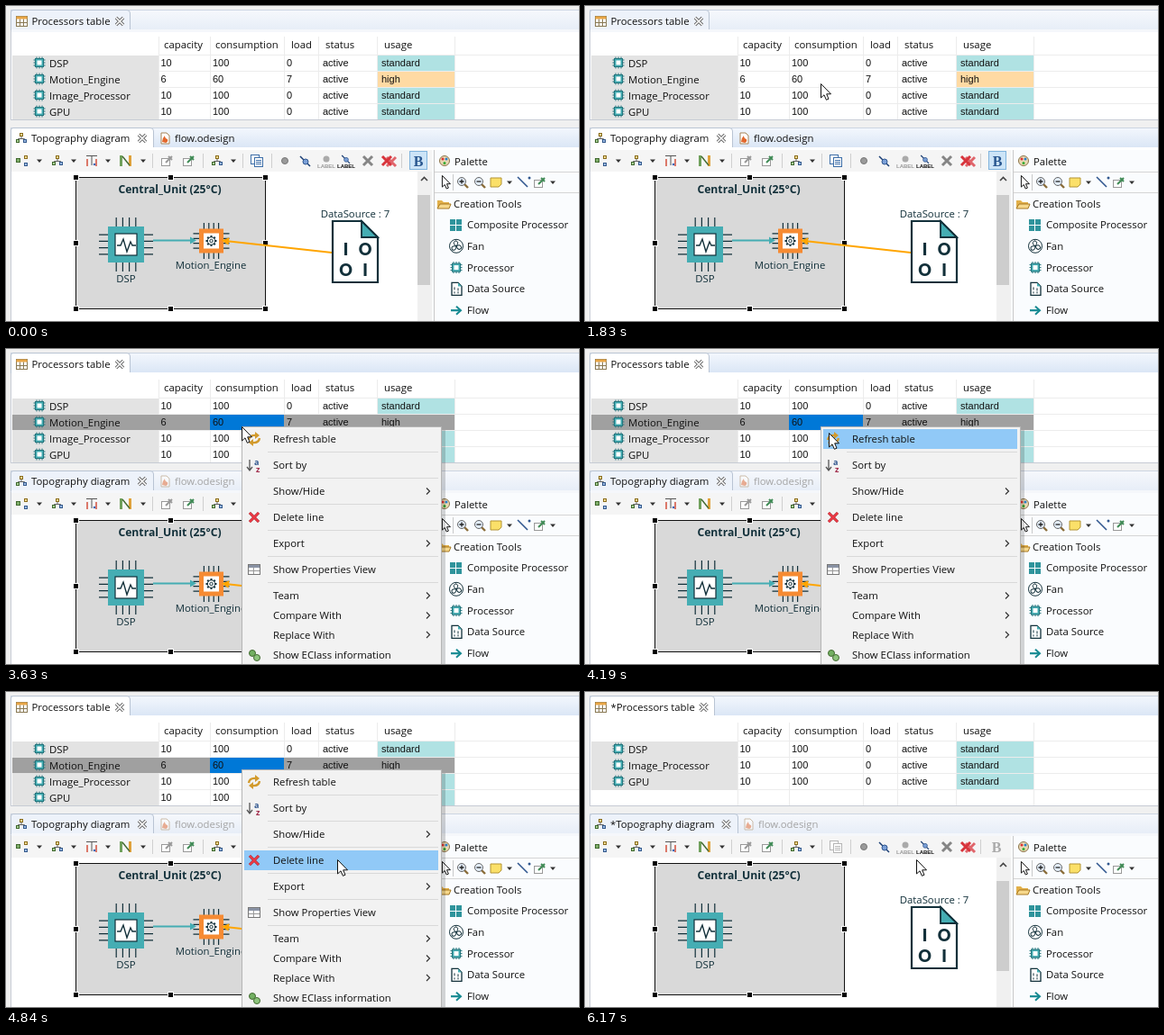
An HTML page that plays this animation: 635 by 350 pixels, repeating every 8.54 s.

```html
<!DOCTYPE html>
<html lang="en">
<head>
<meta charset="utf-8">
<title>Processors table and topography diagram</title>
<style>
html, body { margin: 0; width: 100%; height: 100%; overflow: hidden; background: #f0f0f0; }
svg { display: block; }
text { font: 11.35px "Open Sans", "Noto Sans", sans-serif; fill: #111; white-space: pre; }
.cell { font: 11px "Liberation Sans", Arial, sans-serif; }
.bold { font-weight: 700; font-size: 12.2px; fill: #12303a; }
.dia { fill: #12303a; }
.dim { fill: #a3a3a3; }
.bits { font: 900 18px Lato, "Liberation Sans", sans-serif; fill: #12303a; }
.tag { font: 700 6px "Liberation Sans", sans-serif; }
.bee { font: 700 16px "Liberation Serif", serif; }
.t { animation: 8540ms step-end infinite; opacity: 0; }
.idle { animation-name: idle; }
.busy { animation-name: busy; }
.toolsOn { animation-name: toolsOn; }
.toolsOff { animation-name: toolsOff; }
.sel { animation-name: sel; }
.before { animation-name: before; }
.after { animation-name: after; }
.menu { animation-name: menu; }
.hot0 { animation-name: hot0; }
.hot1 { animation-name: hot1; }
.hot2 { animation-name: hot2; }
.hot3 { animation-name: hot3; }
.ghost { animation-name: ghost; }
.pointer { animation-name: pointer; }
@keyframes idle { 0% { opacity: 1 } 27.985%, 100% { opacity: 0 } }
@keyframes busy { 0% { opacity: 0 } 27.985%, 100% { opacity: 1 } }
@keyframes toolsOn { 0% { opacity: 1 } 29.742%, 100% { opacity: 0 } }
@keyframes toolsOff { 0% { opacity: 0 } 29.742%, 100% { opacity: 1 } }
@keyframes sel { 0% { opacity: 0 } 27.985% { opacity: 1 } 72.248%, 100% { opacity: 0 } }
@keyframes before { 0% { opacity: 1 } 72.248%, 100% { opacity: 0 } }
@keyframes after { 0% { opacity: 0 } 72.248%, 100% { opacity: 1 } }
@keyframes menu { 0% { opacity: 0 } 42.505% { opacity: 1 } 69.437%, 100% { opacity: 0 } }
@keyframes hot0 { 0% { opacity: 0 } 49.063% { opacity: 1 } 50.468%, 100% { opacity: 0 } }
@keyframes hot1 { 0% { opacity: 0 } 52.107% { opacity: 1 } 53.512%, 100% { opacity: 0 } }
@keyframes hot2 { 0% { opacity: 0 } 53.512% { opacity: 1 } 54.918%, 100% { opacity: 0 } }
@keyframes hot3 { 0% { opacity: 0 } 54.918% { opacity: 1 } 69.437%, 100% { opacity: 0 } }
@keyframes ghost { 0% { opacity: 0 } 69.437% { opacity: .68 } 70.843%, 100% { opacity: 0 } }
@keyframes pointer {
  0% { opacity: 0; transform: translate(224px, -4px) }
  9.953% { opacity: 1; transform: translate(224px, -4px) }
  11.709% { opacity: 1; transform: translate(228px, 14px) }
  13.114% { opacity: 1; transform: translate(231px, 36px) }
  14.871% { opacity: 1; transform: translate(249px, 70px) }
  16.276% { opacity: 1; transform: translate(260px, 88px) }
  18.149% { opacity: 1; transform: translate(261px, 89px) }
  21.428% { opacity: 1; transform: translate(261px, 86px) }
  49.063% { opacity: 1; transform: translate(270px, 93px) }
  50.468% { opacity: 1; transform: translate(290px, 117px) }
  52.107% { opacity: 1; transform: translate(316px, 134px) }
  53.512% { opacity: 1; transform: translate(340px, 161px) }
  54.918% { opacity: 1; transform: translate(356px, 181px) }
  56.674%, 100% { opacity: 1; transform: translate(367px, 186px) }
}
</style>
</head>
<body>
<svg id="stage" width="635" height="350" viewBox="0 0 635 350"></svg>
<script>
const TEAL = '#45adb3', DEEP = '#23757d', INK = '#12303a', ORANGE = '#f68b33';

const rect = (x, y, w, h, fill, more = '') =>
  `<rect x="${x}" y="${y}" width="${w}" height="${h}" fill="${fill}" ${more}/>`;
const line = (d, stroke, w = 1, fill = 'none') =>
  `<path d="${d}" stroke="${stroke}" stroke-width="${w}" fill="${fill}"/>`;
const fill = (d, color) => `<path d="${d}" fill="${color}"/>`;
const dot = (x, y, r, color, more = '') => `<circle cx="${x}" cy="${y}" r="${r}" fill="${color}" ${more}/>`;
const text = (x, y, s, cls = '') => `<text x="${x}" y="${y}" class="${cls}">${s}</text>`;
const mid = (x, y, s, cls) => `<text x="${x}" y="${y}" class="${cls}" text-anchor="middle">${s}</text>`;
const at = (x, y, s) => `<g transform="translate(${x} ${y})">${s}</g>`;
const timed = (cls, s) => `<g class="t ${cls}">${s}</g>`;
const each = (list, f) => list.map(f).join('');

// Small icons, centred on 0,0
const tinyChip = each([-3, 0, 3], p => line(`M${p} -6.5V6.5M-6.5 ${p}H6.5`, DEEP)) +
  rect(-4.5, -4.5, 9, 9, TEAL, `stroke="${DEEP}"`) + rect(-2.5, -2.5, 5, 5, '#fff');
const tableIcon = rect(-5.5, -5.5, 12, 11, '#fff', 'stroke="#8a7a55"') + rect(-5.5, -5.5, 12, 3, '#e9a646') +
  line('M-5.5 1.5H6.5M-1.5 -2.5V5.5M2.5 -2.5V5.5', '#8a7a55');
const tree = line('M0 -3V0M-3.5 3V.5H3.5V3', '#666') + rect(-1.5, -5.5, 3, 3, '#f3dc94', 'stroke="#8a6d1d"') +
  rect(-5.5, 1.5, 3, 3, '#a9cf97', 'stroke="#41692f"') + rect(2.5, 1.5, 3, 3, '#9dbbe4', 'stroke="#355a8c"');
const flowIcon = fill('M-4 -6H2L5 -3V6H-4Z', '#fff') + line('M-4 -6H2L5 -3V6H-4Z', '#a58458') +
  fill('M-3 4Q-3 0 0 -3Q0 0 3 1Q4 4 1 5Z', '#e2672c');
const cross = (c, r = 5) => line(`M${-r} ${-r}L${r} ${r}M${r} ${-r}L${-r} ${r}`, c, 3);
const close = line('M-4 -4L4 4M4 -4L-4 4', '#666', 3.4) + line('M-4 -4L4 4M4 -4L-4 4', '#fff', 1.6);
const drop = fill('M-3 -1.5H3L0 2Z', '#333');
const pin = c => rect(-6.5, -2.5, 9, 8, '#fff', 'stroke="#999"') + line('M-2 2L5 -5M1 -5L5 -1', c, 2);
const pen = line('M-6 -5L5 6', '#1c3f75', 1.5) + dot(0, 1, 3, '#7ba0d8', 'stroke="#31578f"');
const lens = sign => line('M2 2L6 6', '#8a6d3a', 2.4) + dot(-1, -1, 4.5, '#e3eefb', 'stroke="#666"') +
  line(sign, '#222', 1.3);
const docIcon = fill('M-5 -7H2L6 -3V7H-5Z', '#fff') + line('M-5 -7H2L6 -3V7H-5Z', INK, 1.3) +
  fill('M2 -7L6 -3H2Z', TEAL) + line('M-2 -2V1M2 -1V2M-2 3V5M2 3V5', INK);

// Tab bars
const tabBar = (y, h, grad, w) => rect(5.5, y + .5, 640, h, `url(#${grad})`, 'stroke="#ccd5e2"') +
  line(`M5.5 ${y + h}V${y + 3}Q5.5 ${y + .5} 8 ${y + .5}H${w - 4}Q${w - .5} ${y + .5} ${w - .5} ${y + 4}V${y + h}`,
    '#b9c4d3', 1, grad === 'on' ? '#fff' : '#edf2fa') +
  rect(6, y + h - 1, 629, 3, grad === 'on' ? '#fff' : '#f5f7fb');
const bars = (top, bottom, shift) => tabBar(4, 23, top, 138 + shift) + tabBar(135, 23, bottom, 164 + shift);
const titles = (star, shift) =>
  text(28.5, 21, star + 'Processors table') + at(126 + shift, 17, close) +
  text(28, 151, star + 'Topography diagram') + at(151 + shift, 147, close);
const flowTab = (x, cls, op) => `<g opacity="${op}">${at(x, 147, flowIcon)}</g>` + text(x + 11, 151, 'flow.odesign', cls);

// Table
const COLS = [169, 226, 308, 346, 411, 497];
const DATA = [
  ['DSP', 10, 100, 0, 'active', 'standard'],
  ['Motion_Engine', 6, 60, 7, 'active', 'high'],
  ['Image_Processor', 10, 100, 0, 'active', 'standard'],
  ['GPU', 10, 100, 0, 'active', 'standard']
];
const KEPT = DATA.filter(r => r[0] !== 'Motion_Engine');
const CELL_X = [48, 171.5, 229, 311, 351, 416];
const rowBack = (r, i) => {
  const y = 55 + i * 18;
  return rect(7, y, 162, 18, '#e3e3e3') +
    rect(412, y, 85, 17, r[5] === 'high' ? '#ffdaa3' : '#b0e2e3') + rect(170, y + 17, 465, 1, '#ececec');
};
const rowText = (r, i) => at(37, 63 + i * 18, tinyChip) +
  each(r, (v, k) => text(CELL_X[k], (k ? 67 : 68) + i * 18, v, k ? 'cell' : ''));
const grid = each(COLS, x => rect(x, 34, 1, 92, '#ececec')) + rect(170, 54, 465, 1, '#ececec');
const selection = rect(7, 73, 490, 17, '#a0a0a0') + rect(226, 73, 82, 17, '#0078d7');
const heads = each([[175, 'capacity'], [232, 'consumption'], [316, 'load'], [354, 'status'], [419, 'usage']],
  ([x, s]) => text(x, 47, s));
const table = rect(6, 29, 629, 97, '#fff') +
  timed('before', each(DATA, rowBack)) + timed('after', each(KEPT, rowBack)) +
  grid + timed('sel', selection) + heads +
  timed('before', each(DATA, rowText)) + timed('after', each(KEPT, rowText)) +
  rect(5, 126, 630, 1, '#c6cbd4') + rect(5, 27, 1, 100, '#c6cbd4');

// Diagram toolbar
const copy = c => rect(-6.5, -6.5, 9, 10, '#fff', `stroke="${c}"`) + rect(-2.5, -3.5, 9, 10, '#fff', `stroke="${c}"`) +
  line('M-1 -.5H5M-1 1.5H5M-1 3.5H5', c);
const labelIcon = (mark, c) => mark + `<text x="0" y="8" class="tag" text-anchor="middle" style="fill:${c}">LABEL</text>`;
const squares = rect(-5.5, -2.5, 4, 4, '#7fae6a', 'stroke="#41692f"') + rect(3.5, -5.5, 3, 3, '#f3dc94', 'stroke="#8a6d1d"') +
  rect(3.5, 2.5, 3, 3, '#9dbbe4', 'stroke="#355a8c"');
const filter = line('M-6 -5.5H6M0 -5V5', '#555') + line('M-5 -2V6M5 -2V6', '#d2452f', 1.4) + dot(3, 4, 1.3, '#4169b8');
const layers = rect(-7, -6, 3, 12, '#6fa05b') + rect(3, -6, 3, 12, '#e0a23c') + line('M-4 -5L4 5', '#41692f', 1.4);
const toolbar = rect(6, 160, 468, 24, '#f5f5f5') +
  at(17, 172, squares) + at(57, 172, tree) + at(95, 172, filter) + at(133, 172, layers) +
  each([37, 75, 113, 152, 252], x => at(x, 172, drop)) +
  each([162, 218, 262, 294, 438], x => rect(x, 164, 1, 16, '#cfcfcf')) +
  at(179, 172, pin('#999')) + at(203, 172, pin('#3f8a55')) + at(234, 172, tree) +
  dot(309, 172, 3.5, '#9a9a9a', 'stroke="#777"') + at(332, 172, pen) +
  at(355, 172, labelIcon(dot(0, -2, 3.5, '#aaa'), '#999')) +
  at(377, 172, labelIcon(`<g transform="translate(0 -2) scale(.8)">${pen}</g>`, '#111')) +
  at(401, 172, cross('#858585')) + at(427, 173, cross('#e0656b')) + at(422, 172, cross('#d8343c')) +
  timed('toolsOn', at(278, 172, copy('#3d6ea8')) +
    rect(447.5, 161.5, 19, 20, '#cce4f7', 'stroke="#7fb3dd"') + `<text x="457" y="178" class="bee" text-anchor="middle" style="fill:#28568f">B</text>`) +
  timed('toolsOff', at(278, 172, copy('#b5b5b5')) +
    `<text x="456" y="178" class="bee" text-anchor="middle" style="fill:#aaa">B</text>`);

// Diagram
const bigChip = (x, y, half, reach, step, color, core) => each([-1.5, -.5, .5, 1.5], k =>
    line(`M${x + k * step} ${y - reach}V${y + reach}M${x - reach} ${y + k * step}H${x + reach}`, INK, 1.2)) +
  rect(x - half, y - half, half * 2, half * 2, color) + rect(x - core, y - core, core * 2, core * 2, '#fff');
const gear = each([0, 45, 90, 135], a => `<path d="M0 -6V6" stroke="${INK}" stroke-width="2" transform="rotate(${a})"/>`) +
  dot(0, 0, 4.2, '#fff', `stroke="${INK}"`) + dot(0, 0, 1.7, '#fff', `stroke="${INK}"`);
const handle = (x, y) => rect(x - 3, y - 3, 7, 7, '#fff') + rect(x - 2, y - 2, 5, 5, '#000');
const unit = rect(77.5, 190.5, 210, 146, '#d9d9d9', 'stroke="#111"') +
  each([77, 182, 287], x => each([190, 263, 336], y => x === 182 && y === 263 ? '' : handle(x, y)));
const scrollbar = rect(456, 184, 15, 166, '#f0f0f0') + rect(456, 210, 14, 100, '#cdcdcd') +
  line('M460 194L463.5 190.5L467 194', '#444', 1.6);
const diagram = rect(6, 184, 452, 166, '#fff') + unit +
  mid(181.5, 208, 'Central_Unit (25°C)', 'bold') +
  bigChip(133, 265, 20, 30, 7.2, TEAL, 12) + rect(121, 253, 24, 24, 'none', `stroke="${INK}" stroke-width="1.2"`) +
  line('M123 266H127L130 259L134 273L138 262L140 266H144', INK, 1.4) + mid(133, 306.5, 'DSP', 'dia') +
  timed('before',
    bigChip(227.5, 261, 13.5, 20, 5.4, ORANGE, 8.5) + at(227.5, 261, gear) +
    mid(227, 292, 'Motion_Engine', 'dia') +
    line('M163 260.5H208', TEAL, 2) + fill('M211 260.5L204 256.5V264.5Z', TEAL) +
    line('M361 274L243 261', '#ffa500', 2) + fill('M239 260.5L247.5 257.3L246.5 265.7Z', '#ffa500')) +
  mid(387, 235, 'DataSource : 7', 'dia') +
  line('M362 239H394L412 257V307H362Z', INK, 2.2, '#fff') + line('M394 239V257H412Z', INK, 1.8, TEAL) +
  mid(376.5, 277, 'I', 'bits') + mid(398, 277, 'O', 'bits') + mid(376.5, 299.5, 'O', 'bits') + mid(398, 299.5, 'I', 'bits') +
  scrollbar;

// Palette
const PANEL = '#fafcfe';
const folder = fill('M-7 -4H-2L0 -2H6V5H-7Z', '#e2b04a') + line('M-7 5L-4 0H8L6 5Z', '#a87922', 1, '#f6d88b');
const fan = dot(0, 0, 7.5, '#fff', `stroke="${INK}"`) +
  each([0, 120, 240], a => `<path d="M0 0Q-5 -3 -1 -6Q4 -5 0 0" fill="none" stroke="${INK}" transform="rotate(${a})"/>`);
const fourSquares = each([-7, 0], x => each([-6, 1], y => rect(x, y, 6, 6, '#2f949c')));
const arrow = line('M-6 0H4', '#168a92', 2.2) + line('M0 -4.5L5 0L0 4.5', '#168a92', 2);
const ITEMS = [['Composite Processor', fourSquares], ['Fan', fan], ['Processor', tinyChip], ['Data Source', docIcon], ['Flow', arrow]];
const POINTER = 'M.5 .5V16L4 12.8L6.4 18.3L9 17.2L6.7 11.8H11.5Z';
const palette = rect(472, 160, 163, 190, PANEL) + rect(474, 160, 1, 190, '#c9c9c9') +
  at(486, 172, dot(0, 0, 5.5, '#ead9b4', 'stroke="#8a744a"') + dot(-2, -2, 1.5, '#d33') + dot(2, -2, 1.5, '#2a7fc9') + dot(0, 2.5, 1.5, '#3a3')) +
  text(497, 177, 'Palette') + rect(475, 184, 160, 1, '#d5d5d5') +
  at(483, 188, `<g transform="scale(.82)">${line(POINTER, '#111', 1.2, '#fff')}</g>`) +
  rect(495, 187, 1, 18, '#c9c9c9') +
  at(506, 196, lens('M-3.5 -1H1.5M-1 -3.5V1.5')) + at(525, 196, lens('M-3.5 -1H1.5')) +
  at(543, 196, line('M-6 -5H6V2L3 5H-6Z', '#b39434', 1, '#fbe069')) + at(558, 196, drop) +
  line('M567 190L578 201', '#31578f', 1.6) + at(580, 191, dot(0, 0, 1.5, '#31578f')) +
  at(592, 196, pin('#3f8a55')) + at(606, 196, drop) +
  rect(475, 207, 160, 1, '#d5d5d5') +
  at(485, 220, folder) + text(496, 224, 'Creation Tools') +
  each(ITEMS, ([s, icon], i) => at(499, 243 + i * 23.8, icon) + text(511, 247 + i * 23.8, s));

// Context menu
const MENU = [[100, 'Refresh table'], [129, 'Sort by'], [158, 'Show/Hide', 1], [187, 'Delete line'], [216, 'Export', 1],
  [245, 'Show Properties View'], [274, 'Team', 1], [296, 'Compare With', 1], [317.5, 'Replace With', 1], [340, 'Show EClass information']];
const hotBar = y => rect(264, y - 11, 215, 22, '#91c9f7');
const redCross = at(275, 187, cross('#9b1a24') + line('M-5 -5L5 5M5 -5L-5 5', '#ee3a45', 2));
const menuIcons =
  at(275, 100, line('M-6 1Q-5 -5 2 -4M6 -1Q5 5 -2 4', '#d29a2c', 2.4) + fill('M1 -8L6 -4L1 0ZM-1 8L-6 4L-1 0Z', '#d29a2c')) +
  at(275, 129, line('M-5 -6V5M-8 2L-5 6L-2 2', '#555', 1.3) + `<text x="0" y="0" style="font-size:9px;font-weight:700;fill:#31578f">a</text><text x="2" y="8" style="font-size:9px;font-weight:700;fill:#a02b4a">z</text>`) +
  redCross +
  at(275, 245, rect(-6.5, -5.5, 13, 11, '#fff', 'stroke="#777"') + rect(-6, -5, 12, 3, '#8a93a5') + line('M-6 1.5H6M-.5 -2V5', '#999')) +
  at(275, 340, dot(-2, -2, 3.5, '#73b062', 'stroke="#41692f"') + dot(3, 3, 3.5, '#8dc47c', 'stroke="#41692f"'));
const menu = rect(265, 90, 222, 264, '#000', 'opacity=".16"') + rect(261.5, 86.5, 221, 270, '#f2f2f2', 'stroke="#b5b5b5"') +
  each([114, 143, 172, 201, 230, 259], y => rect(290, y, 189, 1, '#d9d9d9')) +
  each([0, 1, 2, 3], i => timed('hot' + i, hotBar(MENU[i][0]))) + menuIcons +
  each(MENU, ([y, s, sub]) => text(296, y + 4, s) + (sub ? line(`M466 ${y - 3.5}L469.5 ${y}L466 ${y + 3.5}`, '#333', 1.2) : ''));
const ghost = hotBar(187) + redCross + text(296, 191, 'Delete line');

const gradient = (id, a, b) => `<linearGradient id="${id}" x2="0" y2="1"><stop stop-color="${a}"/><stop offset="1" stop-color="${b}"/></linearGradient>`;

document.getElementById('stage').innerHTML =
  `<defs>${gradient('on', '#f3f7fd', '#d9e5f5')}${gradient('off', '#f6f8fc', '#e6edf7')}</defs>` +
  rect(0, 0, 635, 350, '#f0f0f0') +
  bars('off', 'on', 0) + timed('busy', bars('on', 'off', 0)) + timed('after', bars('on', 'off', 6)) +
  at(17, 17, tableIcon) + at(17, 147, tree) +
  timed('before', titles('', 0)) + timed('after', titles('*', 5.5)) +
  timed('idle', flowTab(176, '', 1)) + timed('sel', flowTab(176, 'dim', .5)) + timed('after', flowTab(181, 'dim', .5)) +
  table + toolbar + diagram + palette + rect(5, 159, 1, 191, '#c6cbd4') +
  timed('menu', menu) + timed('ghost', ghost) +
  timed('pointer', line(POINTER, '#111', 1, '#fff'));
</script>
</body>
</html>
```
